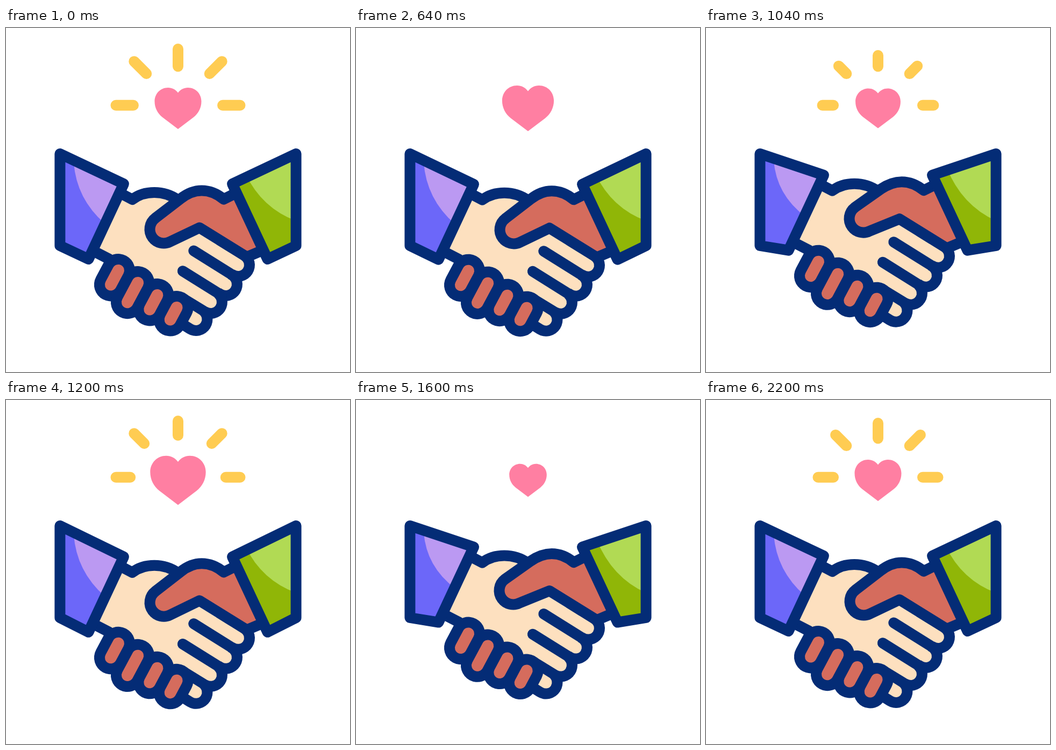
Animation of 640 by 640 pixels, one loop 2.24 s. Source, as an HTML page with a canvas:

```html
<!DOCTYPE html>
<html lang="en">
<head>
<meta charset="utf-8">
<title>Handshake</title>
<style>
html, body { margin: 0; width: 100%; height: 100%; overflow: hidden; background: #fff; }
canvas { display: block; width: 640px; height: 640px; }
</style>
</head>
<body>
<canvas id="stage"></canvas>
<script>
const LOOP = 2240;
const NAVY = '#042c76', CREAM = '#fde0bf', BROWN = '#d56c5d';
const PINK = '#ff7fa2', YELLOW = '#ffcc52';

const canvas = document.getElementById('stage');
const ctx = canvas.getContext('2d');
const dpr = window.devicePixelRatio || 1;
canvas.width = canvas.height = 640 * dpr;

const sine = p => (1 - Math.cos(Math.PI * p)) / 2;
const mix = (a, b, p) => a + (b - a) * p;
const ramp = (t, a, b) => Math.min(1, Math.max(0, (t - a) / (b - a)));
const mid = (a, b) => [(a[0] + b[0]) / 2, (a[1] + b[1]) / 2];

// From rest to the first dip and peak, then an even swing, then back to rest.
function swing(t, m) {
  const wave = at => mix(m.high, m.low, sine((at - m.peak) / m.half));
  if (t < m.dip) return mix(m.rest, m.low, sine(ramp(t, m.start, m.dip)));
  if (t < m.peak) return mix(m.low, m.high, sine(ramp(t, m.dip, m.peak)));
  const last = m.peak + m.half * m.turns;
  return t < last ? wave(t) : mix(wave(last), m.rest, sine(ramp(t, last, m.end)));
}

const SHAKE = { rest: 0, low: -16.6, high: 9, start: 160, dip: 472, peak: 747, half: 276, turns: 3, end: 1977 };
const PULSE = { rest: 1, low: .8, high: 1.2, start: 0, dip: 275, peak: 526, half: 357, turns: 4, end: 2200 };

function line(points, width, color) {
  ctx.beginPath();
  points.forEach(([x, y]) => ctx.lineTo(x, y));
  ctx.lineWidth = width;
  ctx.strokeStyle = color;
  ctx.stroke();
}

function fill(path, color) {
  ctx.fillStyle = color;
  ctx.fill(path);
}

function outline(path) {
  ctx.lineWidth = 20;
  ctx.strokeStyle = NAVY;
  ctx.stroke(path);
}

// Each ray grows outward from its inner end, then shrinks toward its tip.
function drawRays(t) {
  const growing = t < 1160 ? t >= 840 : t >= 1920;
  const tip = growing ? ramp(t % 1080, 840, 1160) || ramp(t, t < 1160 ? 840 : 1920, t < 1160 ? 1160 : LOOP) : 1;
  const tail = growing ? 0 : t < 1160 ? ramp(t, 0, 346) : ramp(t, 1160, 1390);
  if (tip <= tail) return;
  for (let i = 0; i < 5; i++) {
    const angle = Math.PI * (1 + i / 4);
    const inner = i === 2 ? 72.3 : 83;
    const at = p => [320 + Math.cos(angle) * (inner + 32.5 * p), 143.8 + Math.sin(angle) * (inner + 32.5 * p)];
    line([at(tail), at(tip)], 20, YELLOW);
  }
}

const lobe = new Path2D('M0 38.5L-29 16.5C-38 9.5-43.5-1-43.5-13C-43.5-27.5-32.5-38.5-18.5-38.5C-11-38.5-4.5-35 0-29Z');
const heart = new Path2D(lobe);
heart.addPath(lobe, { a: -1, d: 1 });

function drawHeart(t) {
  const s = swing(t, PULSE);
  ctx.save();
  ctx.translate(320, 149.5);
  ctx.scale(s, s);
  fill(heart, PINK);
  ctx.restore();
}

const BACK = 'M214 308L235 319C246 310.5 260 306 276 306C292 306 306 310 320 320';
const wrist = new Path2D(BACK);
const palm = new Path2D(BACK + 'L360 372V383L437.8 431.6L375 519.3L330 492L300 505L192 432L160 414Z');

// The thumb tip swings a little further than the rest of the hand.
function thumbShape(y) {
  const dx = y * .06, dy = y * .22;
  const p = new Path2D();
  p.moveTo(434, 304);
  p.lineTo(405, 318.5);
  p.bezierCurveTo(393, 308.5, 380, 302.5, 364, 302.5);
  p.bezierCurveTo(349, 302.5, 337, 308, 325, 317.5 + dy * .4);
  p.lineTo(278 + dx, 353.5 + dy);
  p.arc(293.5 + dx, 374.5 + dy, 26, -2.21, 1.115, true);
  p.lineTo(360, 371.5);
  p.lineTo(448, 426);
  p.lineTo(486, 410);
  p.closePath();
  return p;
}

const TIPS = [[432, 441], [409, 477], [381, 510], [353.5, 542]];
const along = ([x, y], len) => [x - len * .848, y - len * .53];
const finger = (p, from, to) => [along(p, from), along(p, to)];

const slits = [0, 1].map(i => finger(mid(TIPS[i], TIPS[i + 1]), -7, 84 - 6 * i));
const knuckles = [30, 41, 30, 25.5].map((len, i) => {
  const x = 209 + 36.2 * i, y = 451 + 23 * i;
  return [[x, y], [x - len * .47, y + len * .883]];
});

function drawHands(y) {
  ctx.save();
  ctx.translate(0, y);

  TIPS.forEach(p => line(finger(p, 0, 26), 62, NAVY));
  fill(palm, CREAM);
  TIPS.forEach(p => line(finger(p, 0, 24), 22, CREAM));
  slits.forEach(s => line(s, 20, NAVY));
  outline(wrist);
  line([[160, 413.5], [192, 430]], 20, NAVY);

  const thumb = thumbShape(y);
  fill(thumb, BROWN);
  outline(thumb);

  knuckles.forEach(k => line(k, 62, NAVY));
  knuckles.forEach(k => line(k, 22, BROWN));
  ctx.restore();
}

// The cuff end follows the hands while the outer edge stays put.
function drawSleeve(y, base, light, shine) {
  const shape = new Path2D(`M100.4 234L219 ${290 + y}L153.5 ${430 + y}L100.4 405Z`);
  fill(shape, base);
  ctx.save();
  ctx.clip(shape);
  fill(new Path2D(shine), light);
  ctx.restore();
  outline(shape);
}

function drawSleeves(y) {
  drawSleeve(y, '#6c67f9', '#bb99f2',
    `M126 ${250 + y * .2}Q131 ${318 + y * .5} 184 ${364 + y * .85}L260 300L126 180Z`);
  ctx.save();
  ctx.translate(640, 0);
  ctx.scale(-1, 1);
  drawSleeve(y, '#90b607', '#b1da54',
    `M${194 + y * .1} ${272 + y * .75}Q164 ${335 + y * .3} 100 359L80 200H194Z`);
  ctx.restore();
}

function draw(t) {
  const y = swing(t, SHAKE);
  ctx.setTransform(dpr, 0, 0, dpr, 0, 0);
  ctx.fillStyle = '#fff';
  ctx.fillRect(0, 0, 640, 640);
  ctx.lineCap = ctx.lineJoin = 'round';
  drawRays(t);
  drawHeart(t);
  drawHands(y);
  drawSleeves(y);
}

const start = performance.now();
function tick() {
  draw((performance.now() - start) % LOOP);
  requestAnimationFrame(tick);
}
tick();
</script>
</body>
</html>
```
